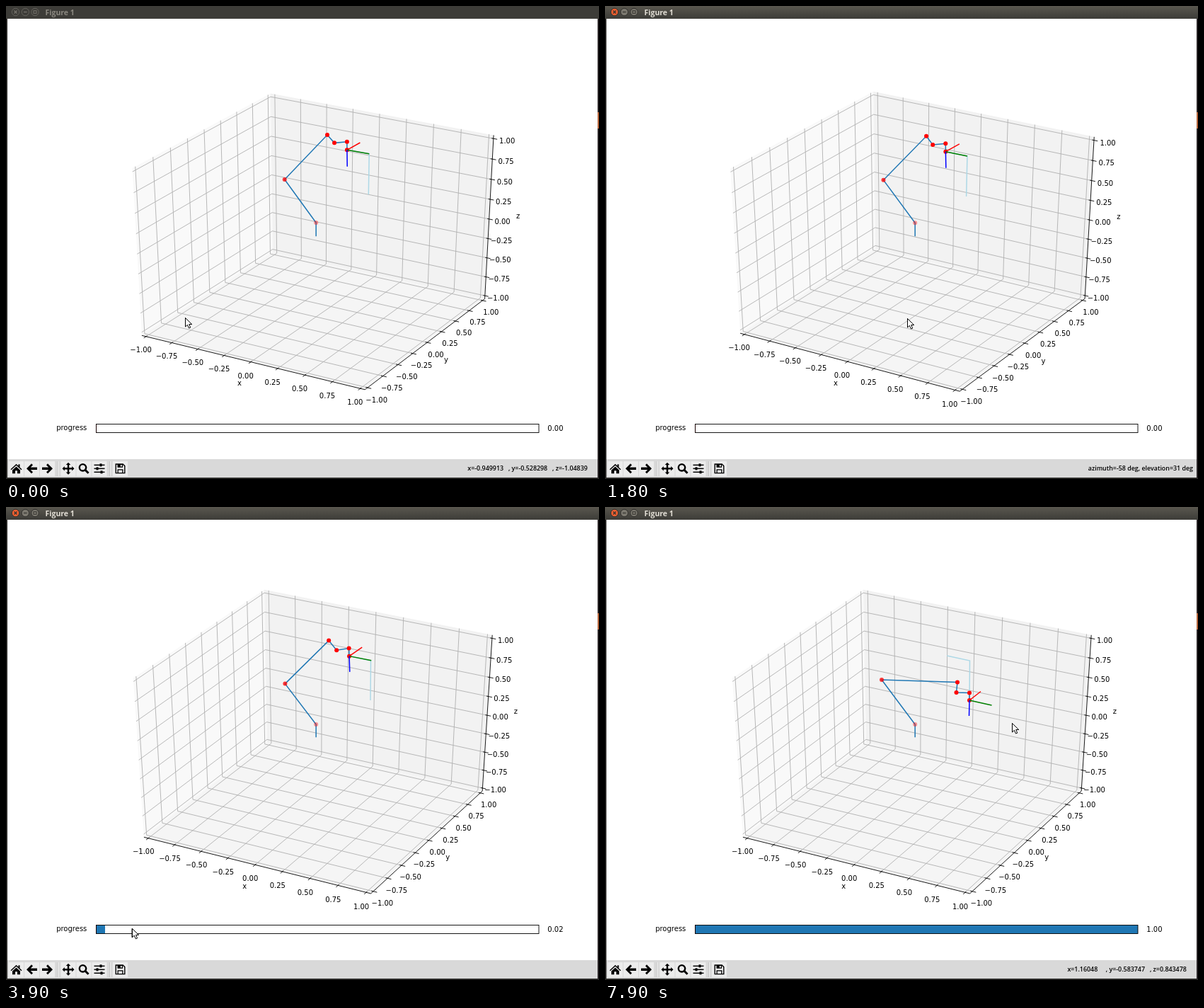
These frames come from a looping animation (838 px wide and 668 px high, 8000 ms). An HTML page with a canvas:

```html
<!DOCTYPE html>
<html lang="en">
<head>
<meta charset="utf-8">
<title>Figure 1</title>
<style>
html, body { margin: 0; width: 100%; height: 100%; overflow: hidden; background: #fff; }
canvas { display: block; width: 838px; height: 668px; }
</style>
</head>
<body>
<canvas id="stage" width="838" height="668"></canvas>
<script>
const g = document.getElementById('stage').getContext('2d');
const LOOP = 8000, STEP = 100;
const PLOT = '10px "DejaVu Sans", sans-serif';
const UI = '"Open Sans", "Noto Sans", sans-serif';

// ---- timeline: time, then values, linear in between ----
const mousePath = [
  [0, 253, 440], [400, 135, 458], [1000, 418, 437], [1500, 416, 437],
  [1800, 427, 441], [2000, 432, 447], [2400, 253, 566]
];
const orbit = [
  [1000, -60, 30], [1300, -59.6, 30.1], [1700, -58.4, 30.8], [1800, -58.7, 31.3], [2100, -62, 34.5]
];
const sliding = [[3300, 0], [3900, .02], [4500, .16], [5400, .46], [7000, 1]];
// the plot redraws in bursts while the slider is dragged (tenths of a second)
const redraws = [33, 34, 36, 37, 39, 40, 43, 44, 45, 47, 48, 49, 54, 58, 62, 63, 67, 70];

function track(keys, t) {
  let i = 0;
  while (i < keys.length - 2 && t > keys[i + 1][0]) i++;
  const a = keys[i], b = keys[i + 1];
  const k = Math.min(1, Math.max(0, (t - a[0]) / (b[0] - a[0])));
  return a.slice(1).map((v, j) => v + (b[j + 1] - v) * k);
}
function progressAt(t) {
  const last = redraws.filter(r => r * 100 <= t).pop() || 0;
  return track(sliding, last * 100)[0];
}
function mouseAt(t, p) {
  if (t < 3300) return track(mousePath, t);
  if (t >= 7900) return [575, 305];
  if (t >= 7500) return [813, 622];
  return [165.5 + 617 * p, 594 + 28 * Math.sin(p * Math.PI / 2)];
}

// ---- camera ----
const CX = 438.16, CY = 325.2, SX = 349.4, SY = 258.9, DIST = 10;
const dot = (a, b) => a[0] * b[0] + a[1] * b[1] + a[2] * b[2];

function makeCamera(az, el) {
  const r = Math.PI / 180, ca = Math.cos(az * r), sa = Math.sin(az * r);
  const ce = Math.cos(el * r), se = Math.sin(el * r);
  const u = [-sa, ca, 0], v = [-se * ca, -se * sa, ce], n = [ce * ca, ce * sa, se];
  return {
    project(p) {
      const k = DIST / (DIST - dot(n, p) / 2) / 2;
      return [CX + SX * k * dot(u, p), CY - SY * k * dot(v, p)];
    },
    unproject([x, y], depth) {
      const k = 2 * (DIST - depth) / DIST;
      const a = (x - CX) / SX * k, b = (CY - y) / SY * k;
      return u.map((_, i) => u[i] * a + v[i] * b + n[i] * 2 * depth);
    }
  };
}
const finalCam = makeCamera(-62, 34.5);

// ---- drawing helpers ----
function line(pts, color, width, fill) {
  g.beginPath();
  pts.forEach(p => g.lineTo(p[0], p[1]));
  if (fill) { g.closePath(); g.fillStyle = fill; g.fill(); }
  if (color) { g.strokeStyle = color; g.lineWidth = width; g.stroke(); }
}
function disc(x, y, r, fill, stroke) {
  g.beginPath();
  g.arc(x, y, r, 0, 7);
  if (fill) { g.fillStyle = fill; g.fill(); }
  if (stroke) { g.strokeStyle = stroke; g.lineWidth = 1; g.stroke(); }
}
function rect(x, y, w, h, fill) { g.fillStyle = fill; g.fillRect(x, y, w, h); }
function text(s, x, y, align, font = PLOT, fill = '#000') {
  g.font = font; g.textAlign = align; g.fillStyle = fill;
  g.fillText(s, x, y);
}

// ---- plot box ----
const M = 1 + 1 / 24, TICK = 1 / 60, PAD = .0818, NAME_PAD = .1778;
const ticks = Array.from({ length: 9 }, (_, i) => i / 4 - 1);
// at(): a point on the axis edge, moved outwards by a and b
const axes = [
  { name: 'x', at: (t, a, b) => [t, -M - a, -M - b], grid: t => [[t, -M, -M], [t, M, -M], [t, M, M]] },
  { name: 'y', at: (t, a, b) => [M + a, t, -M - b], grid: t => [[M, t, -M], [-M, t, -M], [-M, t, M]] },
  { name: 'z', at: (t, a, b) => [M + a, M + b, t], grid: t => [[M, M, t], [-M, M, t], [-M, -M, t]] }
];
const panes = [
  ['#f9f9f9', (a, b) => [-M, a, b]],
  ['#f2f2f2', (a, b) => [a, M, b]],
  ['#f5f5f5', (a, b) => [a, b, -M]]
];

function drawBox(cam) {
  const seg = (pts, ...style) => line(pts.map(cam.project), ...style);
  panes.forEach(([fill, at]) =>
    seg([at(-M, -M), at(M, -M), at(M, M), at(-M, M)], null, 0, fill));
  axes.forEach(ax => ticks.forEach(t => seg(ax.grid(t), '#b0b0b0', .9)));
  axes.forEach(ax => {
    seg([ax.at(-M, 0, 0), ax.at(M, 0, 0)], '#000', .9);
    ticks.forEach(t => {
      seg([ax.at(t, -TICK, 0), ax.at(t, 2 * TICK, 0)], '#000', .9);
      const [x, y] = cam.project(ax.at(t, PAD, PAD));
      text(t.toFixed(2).replace('-', '−'), x, y + 8.7, 'center');
    });
    const [x, y] = cam.project(ax.at(0, NAME_PAD, NAME_PAD));
    text(ax.name, x, y + 2.7, 'center');
  });
}

// ---- arm: depth, then screen place at the start, at MID and at the end ----
const MID = .46;
const arm = {
  elbow: [.235, [394, 250], [398, 244], [391, 244]],
  wrist1: [.344, [454, 188], [490.5, 208], [498, 247.5]],
  wrist2: [.44, [465.5, 201.5], [493, 222], [496.5, 262]],
  wrist3: [.41, [483, 199], [510.5, 219], [515, 262.5]],
  tool: [.38, [483, 210], [516, 231], [515, 273]],
  red: [.27, [500, 197], [547, 224], [531, 260.5]],
  green: [.465, [515.5, 217], [531, 228], [546.5, 280]],
  blue: [.3, [483, 232], [524.5, 256], [514.5, 295]]
};

function drawArm(cam, progress) {
  // each part follows the parabola through its three places
  const at = (name, p) => {
    const [depth, a, b, c] = arm[name];
    const wa = (p - MID) * (p - 1) / MID, wc = p * (p - MID) / (1 - MID), wb = 1 - wa - wc;
    const spot = [0, 1].map(i => a[i] * wa + b[i] * wb + c[i] * wc);
    return cam.project(finalCam.unproject(spot, depth));
  };
  const joints = ['elbow', 'wrist1', 'wrist2', 'wrist3', 'tool'];
  const pts = joints.map(j => at(j, progress));
  const base = cam.project([0, 0, 0]), shoulder = cam.project([0, 0, .17]);
  const joint = ([x, y], depth) => disc(x, y, 3, `rgba(255,0,0,${Math.min(1, .3 + 2 * depth)})`);
  line([at('tool', 0), at('green', 0), at('tool', 1)], '#add8e6', 1.5);
  line([base, shoulder, ...pts], '#1f77b4', 1.5);
  joint(shoulder, .05);
  joints.forEach((j, i) => joint(pts[i], arm[j][0]));
  ['red', 'green', 'blue'].forEach(c => line([pts[4], at(c, progress)], c, 1.5));
}

function drawSlider(p) {
  const x = 127.5, y = 590.5, w = 625.5, h = 12;
  text('progress', 114.3, 599.3, 'right');
  rect(x, y, w * p, h, '#1f77b4');
  line([[x, y], [x, y + h]], '#f00', 1);
  g.strokeStyle = '#000'; g.lineWidth = .9;
  g.strokeRect(x, y, w, h);
  text(p.toFixed(2), 765.3, 599.6, 'left');
}

// ---- window ----
function drawFrame(active) {
  rect(0, 0, 838, 668, '#fff');
  rect(0, 0, 2, 668, '#2a2927');
  rect(836, 0, 2, 668, '#2a2527');
  rect(836, 150, 2, 23, '#b5653c');
  let bar = '#3d3c38';
  if (active) {
    bar = g.createLinearGradient(0, 0, 0, 18);
    bar.addColorStop(0, '#5a574f');
    bar.addColorStop(1, '#3d3c38');
  }
  rect(0, 0, 838, 18, bar);
  const rim = active ? '#2f2e2b' : '#66645e', mark = active ? '#34332f' : '#77746d';
  [13.5, 27.3, 41].forEach((x, i) =>
    disc(x, 8.5, 5.2, active ? (i ? '#7b786f' : '#ee5f30') : null, rim));
  line([[11.5, 6.5], [15.5, 10.5]], mark, 1.2);
  line([[15.5, 6.5], [11.5, 10.5]], mark, 1.2);
  line([[25, 8.5], [29.6, 8.5]], mark, 1.2);
  g.strokeStyle = mark; g.lineWidth = 1;
  g.strokeRect(39, 6.7, 4, 3.6);
  text('Figure 1', 55.5, 12.6, 'left', '700 10.5px ' + UI, active ? '#e2ded5' : '#8b8880');
}

const home = new Path2D('M-8 1L0-6.5 3-3.7V-6H5V-1.8L8 1 7 2 0-4.5-7 2ZM-5.5 2.2L0-2.9 5.5 2.2V7H1.5V3H-1.5V7H-5.5Z');
const arrow = new Path2D('M-7.5 0L-.5-7 1.5-5-1.7-1.7H7.5V1.7H-1.7L1.5 5-.5 7Z');
const disk = new Path2D('M-7-7H4L7-4V7H-7ZM-5.6-5.6V5.6H-4V1H4V5.6H5.6V-3.4L3.6-5.5V-1.5H-4V-5.6ZM.3-5.4H2.3V-2.7H.3ZM-2.7 2.3V5.6H2.7V2.3Z');
const solid = path => () => g.fill(path, 'evenodd');

const icons = [
  [14.5, solid(home)],
  [36.5, solid(arrow)],
  [58.5, () => { g.scale(-1, 1); g.fill(arrow); }],
  [88, () => {
    for (let i = 0; i < 4; i++) {
      line([[0, -8.5], [3.3, -5.2], [1.2, -5.2], [1.2, 1.2], [-1.2, 1.2], [-1.2, -5.2], [-3.3, -5.2]], null, 0, '#000');
      g.rotate(Math.PI / 2);
    }
  }],
  [110, () => {
    disc(-1.5, -1.5, 4.7);
    g.strokeStyle = '#000'; g.lineWidth = 2.4; g.stroke();
    line([[2, 2], [6.5, 6.5]], '#000', 3);
  }],
  [132, () => [[-5, 2], [0, -3], [5, 3]].forEach(([y, x]) => {
    line([[-7.5, y], [7.5, y]], '#000', 1.5);
    rect(x - 1.5, y - 2, 3, 4, '#000');
  })],
  [161.5, solid(disk)]
];

function drawToolbar() {
  rect(2, 640, 834, 26, '#d9d9d9');
  rect(0, 666, 838, 2, '#2a2927');
  [73.5, 147].forEach(x => {
    rect(x - 1, 643, 1, 21, '#c4c4c4');
    rect(x, 643, 1, 21, '#efefef');
  });
  icons.forEach(([x, paint]) => {
    rect(x - 10.5, 643, 21, 21, '#ececec');
    g.save();
    g.translate(x, 653.3);
    g.fillStyle = '#000';
    paint();
    g.restore();
  });
}

// Coordinates as a plane over the mouse position
function readout(mx, my) {
  const a = [-.949913, -.528298, -1.04839];
  const down = [-.227324, -1.30462, -1.35129];
  const right = [1.16048, -.583747, .843478];
  const k = (mx - 253) / 322, m = (my - 440 + 135 * k) / 126;
  return a.map((v, i) => {
    const n = v + k * (right[i] - v) + m * (down[i] - v);
    return 'xyz'[i] + '=' + String(+n.toPrecision(6)).padEnd(12);
  }).join(', ');
}
function drawStatus(t, mx, my) {
  let s = '';
  if (t >= 1100 && t < 2100) {
    const [az, el] = track(orbit, t - STEP);
    s = `azimuth=${Math.round(az)} deg, elevation=${Math.round(el)} deg`;
  } else if (t < 3300 || t >= 7900) s = readout(mx, my);
  text(s, 831, 656.3, 'right', '600 8.9px ' + UI);
}

function drawCursor(x, y) {
  const shape = [[0, 0], [0, 12.5], [2.9, 9.8], [5, 14.5], [7.2, 13.6], [5.2, 9], [9.2, 9]];
  line([...shape, shape[0], shape[1]].map(p => [p[0] + x + .5, p[1] + y + .5]), '#000', 1, '#fff');
}

function draw(time) {
  const t = Math.floor(time % LOOP / STEP) * STEP;
  const progress = progressAt(t);
  const [mx, my] = mouseAt(t, progress);
  const cam = makeCamera(...track(orbit, t));
  drawFrame(t >= 1000);
  drawBox(cam);
  drawArm(cam, progress);
  drawSlider(progress);
  drawToolbar();
  drawStatus(t, mx, my);
  drawCursor(mx, my);
}

const start = performance.now();
function tick() {
  draw(performance.now() - start);
  requestAnimationFrame(tick);
}
tick();
</script>
</body>
</html>
```
